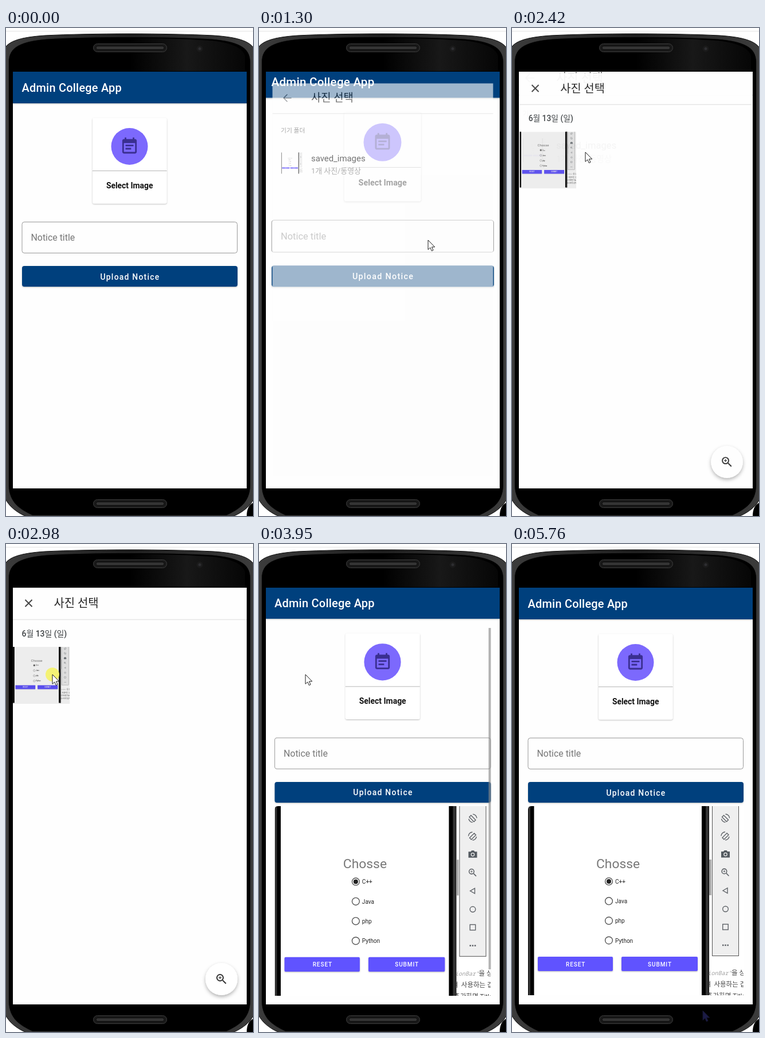
An HTML page that plays this animation: 431x849 px, repeating every 5830 ms.

```html
<!DOCTYPE html>
<html lang="en">
<head>
<meta charset="utf-8">
<title>Admin app demo</title>
<style>
html, body { margin: 0; width: 100%; height: 100%; overflow: hidden; background: #fff; }
svg { display: block; }
text { font-family: Roboto, "Noto Sans CJK KR", "Noto Sans CJK", sans-serif; }
.mid { text-anchor: middle; }
.med { font-weight: 500; }
.title { font-size: 19.9px; fill: #222; }
.small { font-size: 10px; }
.line { fill: none; stroke: #5f6368; stroke-width: 1.4; }
</style>
</head>
<body>
<svg width="431" height="849" viewBox="0 0 431 849" xmlns="http://www.w3.org/2000/svg">
<defs>
  <linearGradient id="sheen">
    <stop offset=".5" stop-color="#000"/><stop offset=".75" stop-color="#181818"/><stop offset="1" stop-color="#060606"/>
  </linearGradient>
  <linearGradient id="rim">
    <stop offset="0" stop-color="#222"/><stop offset=".01" stop-color="#3c3c3c"/>
    <stop offset=".5" stop-color="#1c1c1c"/><stop offset=".99" stop-color="#3c3c3c"/><stop offset="1" stop-color="#222"/>
  </linearGradient>
  <filter id="shadow" x="-20%" y="-20%" width="140%" height="150%">
    <feDropShadow dx="0" dy="1" stdDeviation="1.3" flood-opacity=".28"/>
  </filter>
  <filter id="lift" x="-30%" y="-30%" width="160%" height="170%">
    <feDropShadow dx="0" dy="3" stdDeviation="3" flood-opacity=".3"/>
  </filter>
  <clipPath id="screenClip"><rect x="12" y="76" width="408" height="725"/></clipPath>
  <clipPath id="scrollClip"><rect x="27" y="147" width="378" height="638"/></clipPath>
  <clipPath id="photoClip"><path d="M28 462q0-6 6-6H404V835H28Z"/></clipPath>
  <clipPath id="thumbClip"><rect x="12" y="179" width="99.5" height="99"/></clipPath>
  <clipPath id="codeClip"><rect x="343.5" y="735" width="60.5" height="100"/></clipPath>

  <g id="zoom" fill="none" stroke="currentColor" stroke-width="2">
    <circle cx="9.5" cy="9.5" r="5.5"/><path d="M14 14l5.8 5.8"/><path d="M7 9.5h5M9.5 7v5" stroke-width="1.2"/>
  </g>
  <g id="turn" class="line">
    <path d="M-3-5L5 3 2 6-6-2Z"/><path d="M0-7A7 7 0 0 1 7 0M0 7A7 7 0 0 1-7 1"/>
  </g>
  <g id="speaker">
    <rect x="152.500" y="0.500" width="128" height="14" rx="7" fill="#191919" stroke="#3d3d3d"/>
    <rect x="157" y="4.500" width="119" height="6" rx="3" fill="#343434" stroke="#0a0a0a"/>
  </g>

  <g id="photo" transform="translate(-28 -456)">
    <g clip-path="url(#photoClip)">
      <rect x="28" y="456" width="376" height="379" fill="#fff"/>
      <path d="M28 456h10.500v379H28ZM331 456h13v379h-13Z"/>
      <path d="M29 456h3v379h-3ZM338 456h5v379h-5Z" fill="#333"/>
      <path d="M344 549h4v62h-4Z" fill="#aaa"/>
      <text class="mid" x="185" y="564" font-size="22.800" fill="#787878">Chosse</text>
      <g id="options"></g>
      <g filter="url(#shadow)" fill="#6152ff">
        <rect x="45" y="718" width="131" height="25" rx="2"/><rect x="191" y="718" width="133" height="25" rx="2"/>
      </g>
      <g class="med small mid" fill="#fff" letter-spacing=".9">
        <text x="111.200" y="734.500">RESET</text><text x="258" y="734.500">SUBMIT</text>
      </g>
      <rect x="349.500" y="440" width="46" height="276.500" fill="#efefef" stroke="#555"/>
      <use href="#turn" x="372.500" y="477"/>
      <use href="#turn" transform="translate(372 508) scale(-1 1)"/>
      <path d="M365 535h4l1.500-2h4l1.500 2h4v10.500h-15Z" fill="#555b61"/>
      <circle cx="372.500" cy="540" r="2.700" fill="#555b61" stroke="#efefef" stroke-width="1.200"/>
      <use href="#zoom" transform="translate(363 562) scale(.78)" color="#5f6368"/>
      <path class="line" d="M368 603l8-4.500v9Z"/>
      <circle class="line" cx="372.500" cy="635" r="4.800"/>
      <rect class="line" x="367.700" y="661.500" width="9.500" height="9.500"/>
      <path d="M367 698h2.500m1.700 0h2.500m1.700 0h2.500" stroke="#5f6368" stroke-width="2.500"/>
      <g clip-path="url(#codeClip)" font-size="11.500" fill="#444">
        <text x="341.500" y="750" style="font:italic 10px 'Noto Sans Mono','DejaVu Sans Mono',monospace" fill="#a0a0a0">ionBar"</text>
        <text x="383" y="750">을 상</text>
        <text x="339" y="770">ㅕ 사용하는 겁</text>
        <text x="340" y="790">추가하면 Title</text>
        <text x="340" y="810">표시하지 않게</text>
      </g>
    </g>
  </g>
</defs>

<rect width="431" height="849" fill="#fff"/>
<path d="M0 5.500H431" stroke="#e4e4e4"/>
<path d="M431 826Q420 832 420 849H431Z"/>
<path d="M-5 44C-3 23 25 16 68 13C150 9 280 9 362 13C405 16 432 23 436 44V808C432 832 408 846 388 853H43C23 846 0 832-5 808Z" fill="url(#rim)" stroke="#0c0c0c"/>
<path d="M4.500 60C4 32 28 23 70 19C150 14 280 14 360 19C402 23 427 32 426.500 60V796C426 826 406 838 385 848H46C25 838 5 826 4.500 796Z" stroke="#3a3a3a" stroke-width=".7"/>
<path d="M14 75V48Q20 28 70 22Q215 13 360 22Q411 28 417 48V75Z" fill="url(#sheen)"/>
<use href="#speaker" y="27"/>
<use href="#speaker" y="820"/>
<circle cx="338" cy="36" r="5.500" fill="#1b1b1b"/><circle cx="338" cy="36" r="2.500" fill="#2d2d30"/>

<g clip-path="url(#screenClip)">
  <rect x="12" y="76" width="408" height="725" fill="#fff"/>

  <g id="app">
    <rect x="12" y="76" width="408" height="725" fill="#fefefe"/>
    <rect x="12" y="76" width="408" height="55" fill="#00417d" filter="url(#shadow)"/>
    <text class="med" x="27.500" y="111" font-size="19.900" letter-spacing=".25" fill="#fff">Admin College App</text>
    <g clip-path="url(#scrollClip)">
      <g id="content">
        <rect x="151" y="156.500" width="129.500" height="149" rx="3" fill="#fff" filter="url(#shadow)"/>
        <path d="M151 248.500h129.500" stroke="#b5b5b5"/>
        <circle cx="215.500" cy="206" r="32" fill="#7c69fd"/>
        <path transform="translate(198.700 189) scale(1.400)" fill="#3a2f91" d="M17 10H7v2h10v-2zm2-7h-1V1h-2v2H8V1H6v2H5c-1.100 0-2 .9-2 2v14c0 1.100.9 2 2 2h14c1.100 0 2-.9 2-2V5c0-1.100-.9-2-2-2zm0 16H5V8h14v11zm-5-5H7v2h7v-2z"/>
        <text class="mid" x="215.700" y="279" font-size="13.900" font-weight="700" fill="#111">Select Image</text>
        <rect x="28" y="337.500" width="375.500" height="54" rx="4" fill="none" stroke="#999"/>
        <text x="43.500" y="370" font-size="15.900" fill="#777">Notice title</text>
        <rect x="28" y="414" width="376" height="36" rx="4" fill="#00417d" filter="url(#shadow)"/>
        <text class="med mid" x="216.500" y="437.500" font-size="13.900" letter-spacing="1.240" fill="#fff">Upload Notice</text>
        <use id="preview" href="#photo" transform="translate(28 456)"/>
      </g>
      <path id="glow" fill="#00417d" fill-opacity=".1"/>
      <rect id="bar" x="400" y="147" width="4" height="592" fill="#8a8a8a" fill-opacity=".65"/>
    </g>
  </g>

  <g id="folders">
    <rect x="12" y="76" width="408" height="725" fill="#fefefe"/>
    <path d="M12 131.500H420" stroke="#e6e6e6" stroke-width="1.500"/>
    <path d="M47 103H33M39.500 96.200L32.700 103l6.800 6.800" class="line" stroke-width="2"/>
    <text class="title" x="83.500" y="110">사진 선택</text>
    <text x="27.500" y="167" font-size="11.400" fill="#757575">기기 폴더</text>
    <use href="#photo" transform="translate(28 203) scale(.105)"/>
    <text x="83.500" y="220" font-size="15.800" fill="#222">saved_images</text>
    <text x="83.500" y="242" font-size="13.700" fill="#808080">1개 사진/동영상</text>
  </g>

  <rect id="dim" x="12" y="76" width="408" height="725"/>
  <g id="dialog">
    <rect x="20" y="393" width="392" height="90" fill="#fff" filter="url(#lift)"/>
    <text x="43.500" y="432" font-size="14.200" fill="#555">다운로드 중... <tspan class="med">1</tspan>개 남음</text>
    <path d="M369.500 415.500l12.500 12.500m0-12.500l-12.500 12.500" class="line" stroke-width="2"/>
  </g>

  <g id="photos">
    <rect x="12" y="76" width="408" height="725" fill="#fefefe"/>
    <path d="M12 131.500H420" stroke="#e6e6e6" stroke-width="1.500"/>
    <path d="M33.500 97l12 12m0-12l-12 12" stroke="#444" stroke-width="2"/>
    <text class="title" x="83.500" y="110">사진 선택</text>
    <text class="med" x="27.500" y="160.500" font-size="13.900" fill="#3c4043">6월 13일 (일)</text>
    <g clip-path="url(#thumbClip)">
      <use href="#photo" transform="translate(12 176.500) scale(.2645)"/>
      <rect x="12" y="179" width="99.500" height="99" fill-opacity=".07"/>
    </g>
    <circle cx="376" cy="757" r="28" fill="#fff" filter="url(#lift)"/>
    <use href="#zoom" transform="translate(364 745)" color="#333"/>
  </g>
</g>

<circle id="press" r="12" fill="#f5f264" fill-opacity=".88"/>
<path id="cursor" d="M0 0V16.500L3.800 13 6.300 18.800 9 17.600 6.500 12H11.700Z" fill="#fff" stroke="#1c1c1c"/>
</svg>

<script>
const LOOP = 5830;
const $ = id => document.getElementById(id);

$("options").innerHTML = ["C++", "Java", "php", "Python"].map((name, i) => {
  const y = 587 + i * 34.2;
  const dot = i ? "" : `<circle cx="169" cy="${y}" r="4" fill="#222"/>`;
  return `<circle cx="169" cy="${y}" r="6.4" fill="none" stroke="#555" stroke-width="1.4"/>${dot}
    <text class="small" x="180" y="${y + 4}" fill="#222">${name}</text>`;
}).join("");

// Bursts of picture changes: first, last, count.
const BURSTS = [
  [70, 260, 4], [410, 620, 4], [880, 1430, 9], [1500, 2070, 9], [2140, 2700, 9],
  [2770, 2980, 4], [3130, 3130, 1], [3330, 3880, 9], [3950, 4510, 9],
  [4790, 5340, 8], [5410, 5410, 1], [5550, 5760, 4]
];
const STEPS = [0, ...BURSTS.flatMap(([a, b, n]) =>
  Array.from({ length: n }, (_, i) => a + (n > 1 ? (b - a) * i / (n - 1) : 0)))];

const POINTER = [
  [70, 387, 727], [260, 275, 303], [350, 275, 303], [620, 242, 242], [820, 242, 242],
  [1290, 295, 369], [1430, 295, 369], [1860, 128, 216], [2700, 128, 216],
  [2980, 81, 227], [3950, 81, 227], [4510, 150, 306], [5050, 150, 306], [5340, 333, 812]
];
const SCROLL = [[4720, 0], [4860, 45], [4930, 50], [5070, 0]];
const GLOW = [[5000, 0], [5130, 60], [5340, 30], [5400, 0]];
const BAR = [[4280, 1], [4510, 0], [4720, 0], [4790, 1], [5480, 1], [5750, 0]];
const DIM = [[3260, 0], [3330, .1], [3467, .26], [3600, .5]];
const DIALOG = [[3380, 0], [3467, .18], [3600, 1]];

const clamp = v => Math.min(1, Math.max(0, v));
const span = (t, start, length) => clamp((t - start) / length);
const easeOut = u => 1 - (1 - u) ** 3;

function at(track, t, col = 1) {
  const i = track.findIndex(k => k[0] > t);
  if (i === 0) return track[0][col];
  if (i < 0) return track[track.length - 1][col];
  const a = track[i - 1], b = track[i];
  return a[col] + (b[col] - a[col]) * (t - a[0]) / (b[0] - a[0]);
}

function layer(id, scale, alpha) {
  const el = $(id);
  el.setAttribute("transform", `translate(216 438) scale(${scale}) translate(-216 -438)`);
  el.style.opacity = alpha;
  el.style.display = alpha > 0 ? "" : "none";
}

function draw(t) {
  const opened = easeOut(span(t, 1195, 350));
  const listed = easeOut(span(t, 2190, 350));
  const closed = span(t, 3250, 160);
  const back = easeOut(span(t, 3600, 580));
  const cover = 1 - span(t, 3590, 170);
  const returning = t >= 3590;

  layer("app", returning ? 1.05 - .05 * back : 1 + .05 * opened, 1);
  const folderScale = t > 3250 ? 1.05 - .05 * easeOut(span(t, 3330, 417)) : 1 + .05 * listed;
  layer("folders", opened < 1 ? .85 + .15 * opened : folderScale, opened * cover);
  layer("photos", closed ? 1 - .1 * closed : .85 + .15 * listed, listed * (1 - closed));

  $("dim").style.opacity = at(DIM, t) * cover;
  $("dialog").style.opacity = at(DIALOG, t) * cover;
  $("preview").style.display = returning ? "" : "none";
  $("content").setAttribute("transform", `translate(0 ${-at(SCROLL, t)})`);
  $("glow").setAttribute("d", `M28 147H404Q216 ${147 + 2 * at(GLOW, t)} 28 147Z`);
  $("bar").style.opacity = returning ? at(BAR, t) : 0;
  $("bar").setAttribute("y", 147 + at(SCROLL, t) * .92);

  const move = `translate(${at(POINTER, t)} ${at(POINTER, t, 2)})`;
  const cursor = $("cursor"), gone = t >= 5330;
  cursor.setAttribute("transform", move);
  cursor.setAttribute("fill", gone ? "#1b1b45" : "#fff");
  cursor.setAttribute("stroke", gone ? "#15152f" : "#1c1c1c");
  cursor.style.display = t < 70 ? "none" : "";
  const pressed = [[620, 880], [2065, 2200], [2980, 3130]].some(([a, b]) => t >= a && t < b);
  $("press").setAttribute("transform", move);
  $("press").style.display = pressed ? "" : "none";
}

const begin = performance.now();
function frame() {
  const t = (performance.now() - begin) % LOOP;
  draw(STEPS.filter(s => s <= t).pop());
  requestAnimationFrame(frame);
}
draw(0);
requestAnimationFrame(frame);
</script>
</body>
</html>
```
